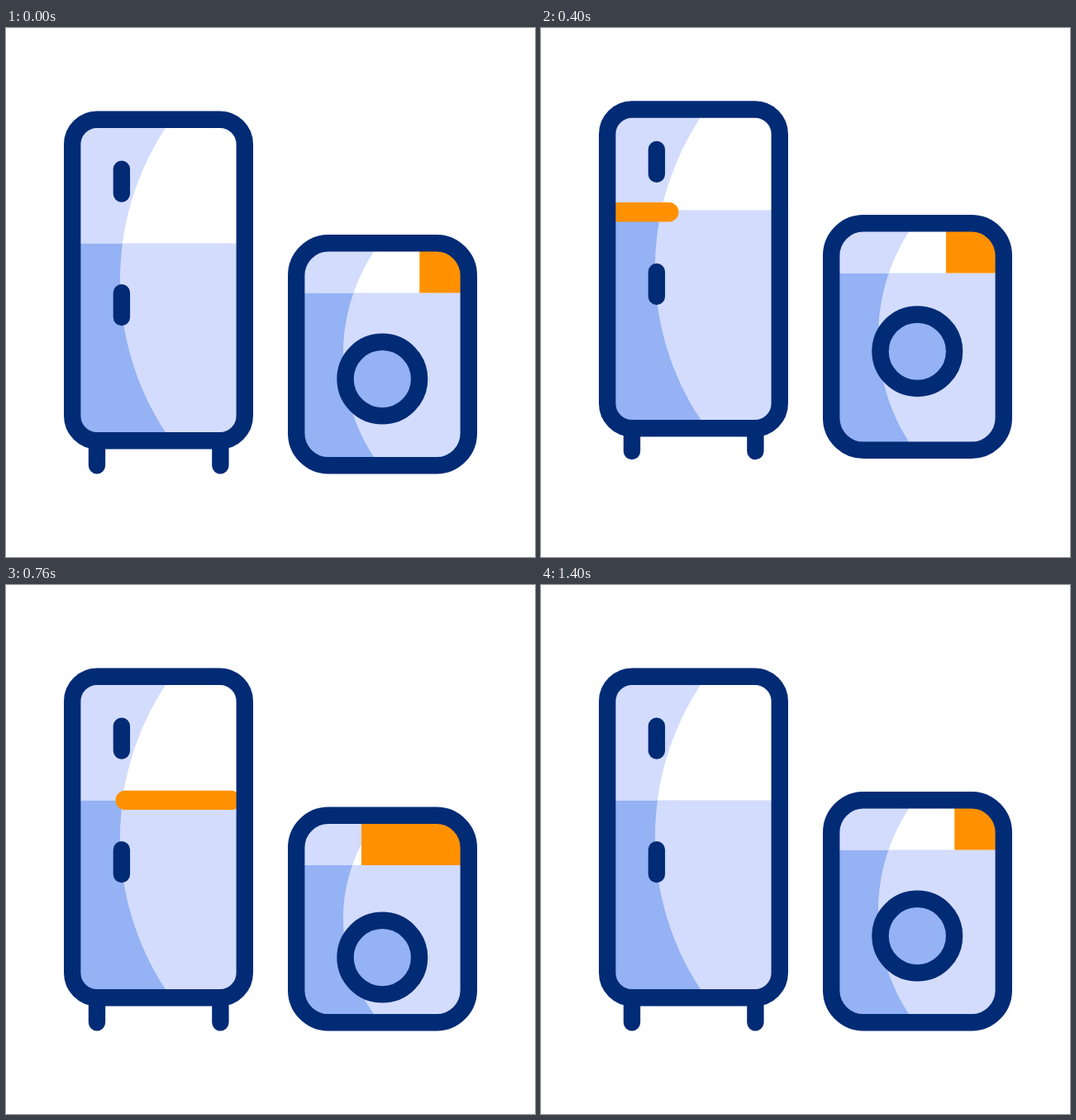
Recreate the animation shown at these times as an HTML page. Size 640 by 640 pixels, loop 1480 ms.

```html
<!DOCTYPE html>
<html lang="en">
<head>
<meta charset="utf-8">
<title>Bouncing appliances</title>
<style>
  html, body { margin: 0; width: 100%; height: 100%; overflow: hidden; background: #fff; }
  svg { display: block; width: 100%; height: 100%; }
  .line { fill: none; stroke: #022b76; stroke-width: 20.4; stroke-linecap: round; }
  .light { fill: #d3dcfd; }
  .mid { fill: #94b2f4; }
  .white { fill: #fff; }
  .accent { fill: #ff9100; }
</style>
</head>
<body>
<svg viewBox="0 0 640 640">
  <defs>
    <clipPath id="fBody"><rect id="fClip" x="80.2" width="208.6" rx="30"/></clipPath>
    <clipPath id="fUpper"><rect id="fTop" x="80" y="0" width="210"/></clipPath>
    <clipPath id="wBody"><rect id="wClip" x="351.2" width="208.6" rx="39"/></clipPath>
    <clipPath id="wUpper"><rect id="wTop" x="351" y="0" width="210"/></clipPath>
  </defs>

  <path id="feet" class="line"/>
  <g clip-path="url(#fBody)">
    <rect class="light" width="640" height="640"/>
    <path id="fShade" class="mid"/>
    <g clip-path="url(#fUpper)">
      <rect class="white" width="640" height="640"/>
      <path id="fGlow" class="light"/>
    </g>
    <rect id="pill" class="accent" width="151.5" height="23.4" rx="11.7"/>
  </g>
  <rect id="fFrame" class="line" x="80.2" width="208.6" rx="30"/>
  <path id="handles" class="line"/>

  <g clip-path="url(#wBody)">
    <rect class="light" width="640" height="640"/>
    <path id="wShade" class="mid"/>
    <g clip-path="url(#wUpper)">
      <rect class="white" width="640" height="640"/>
      <path id="wGlow" class="light"/>
      <rect id="panel" class="accent" width="200" height="640"/>
    </g>
  </g>
  <rect id="wFrame" class="line" x="351.2" width="208.6" rx="39"/>
  <circle id="drum" class="line" cx="455.3" r="44.8" style="fill:#94b2f4"/>
</svg>
<script>
const LOOP = 1480, STEP = 40, DELAY = 5, HALF = 10.2;
const $ = id => document.getElementById(id);
const smooth = u => u * u * (3 - 2 * u);
const linear = u => u;

function set(id, attrs) {
  for (const name in attrs) $(id).setAttribute(name, attrs[name]);
}

// Value at n on a list of [step, value] keys
function track(n, keys, ease) {
  if (n <= keys[0][0]) return keys[0][1];
  for (let i = 1; i < keys.length; i++) {
    const [a, p] = keys[i - 1], [b, q] = keys[i];
    if (n <= b) return p + (q - p) * ease((n - a) / (b - a));
  }
  return keys[keys.length - 1][1];
}

// Jump: rise to `peak`, land at `dip`, recover
const jump = (n, peak, dip) => track(n, [[2, 0], [7, peak], [14, dip], [19, 0]], smooth);

// Left-hand shading bounded by an arc that stretches with the body
function shade(x0, left, x1, x2, top, bottom) {
  const mid = (top + bottom) / 2, h = (bottom - top) / 2;
  const c1 = left + (x1 - left) * 0.347, c2 = left + (x2 - left) * 0.347;
  return `M${x0} ${top - 10}H${x1 + 6.6}L${x1} ${top}` +
    `C${c1} ${top + h * 0.297} ${left} ${mid - h * 0.355} ${left} ${mid}` +
    `C${left} ${mid + h * 0.355} ${c2} ${bottom - h * 0.297} ${x2} ${bottom}` +
    `L${x2 + 6.6} ${bottom + 10}H${x0}Z`;
}

function body(key, top, bottom, divider, arc) {
  const box = { y: top, height: bottom - top };
  set(key + 'Clip', box);
  set(key + 'Frame', box);
  set(key + 'Top', { height: divider });
  set(key + 'Shade', { d: arc });
  set(key + 'Glow', { d: arc });
}

function fridge(n) {
  const dTop = jump(n, -39.7, 30), dBottom = jump(n, -28.6, 6);
  const top = 110.7 + dTop, bottom = 499.3 + dBottom;
  const divider = 260.6 + track(n, [[2, 0], [7, -67], [14, 0.5], [16, 5], [19, 0]], smooth);
  const squash = Math.max(0, dTop - dBottom);
  body('f', top, bottom, divider,
    shade(80, 138, 193 - squash * 0.13, 193 + squash * 0.16, top + HALF, bottom - HALF));

  const foot = 529.3 + jump(n, -28.6, 0);
  set('feet', { d: `M110 ${bottom}V${foot}M259.4 ${bottom}V${foot}` });

  const h1 = 170.8 + jump(n, -58.6, 30), h2 = 320.2 + jump(n, -57, 23.5);
  set('handles', { d: `M139.9 ${h1}v29.8M139.9 ${h2}v29.8` });

  set('pill', {
    x: track(n, [[2, -79], [5, -43.5], [10, 15], [16, 102], [19, 132.5], [27, 225], [32, 282]], linear),
    y: 248.7 + jump(n, -67.9, 9)
  });
}

function washer(n) {
  const m = n - DELAY, dTop = jump(m, -37, 18.5);
  const top = 260.3 + dTop, bottom = 529.3 + jump(m, -28.6, 0);
  body('w', top, bottom, 320.4 + dTop,
    shade(351, 408, 445, 445, top + HALF, bottom - HALF));
  set('drum', { cy: 424.6 + jump(m, -51.5, 26) });
  set('panel', {
    x: track(n, [[7, 500.3], [10, 490], [16, 452], [19, 430], [20, 428], [27, 464], [33, 496], [35, 500.3]], linear)
  });
}

function draw(ms) {
  const n = Math.floor((ms % LOOP) / STEP);
  fridge(n);
  washer(n);
}

let start = null;
function tick(now) {
  if (start === null) start = now;
  draw(now - start);
  requestAnimationFrame(tick);
}
draw(0);
requestAnimationFrame(tick);
</script>
</body>
</html>
```
